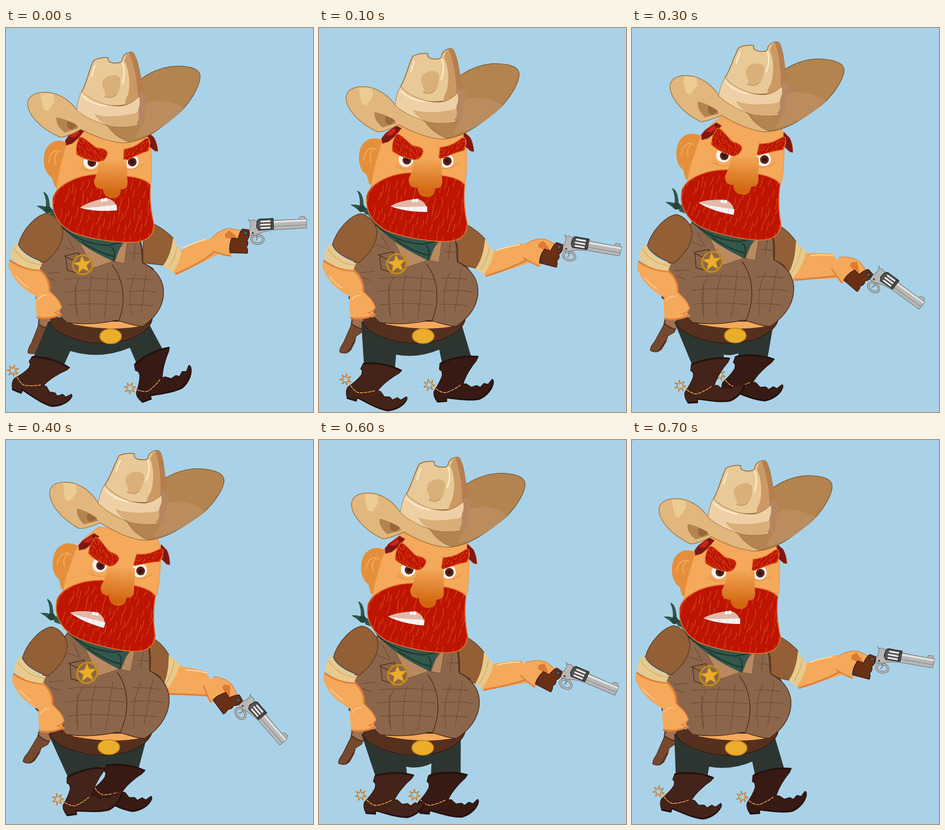
Recreate the animation shown at these times as an HTML page with a canvas. Size 669x837 px, loop 800 ms.

```html
<!DOCTYPE html>
<html lang="en">
<head>
<meta charset="utf-8">
<title>Walking sheriff</title>
<style>
html, body { margin: 0; width: 100%; height: 100%; overflow: hidden; background: #a9d2e8; }
canvas { display: block; width: 669px; height: 837px; }
</style>
</head>
<body>
<canvas id="stage" width="669" height="837"></canvas>
<script>
const c = document.getElementById('stage').getContext('2d');
const SKIN = '#f4a95b', SHADE = '#e0803a', RED = '#be1400', RUST = '#e2702a', STRAND = '#da5a1e';
const TAN = '#e9c997', TAN_LINE = '#a0713c', BROWN = '#b3844f', GLOW = '#fbeccd';
const VEST = '#8b664b', SEAM = '#6f452c', DARK = '#4a2814', GREEN = '#33574a', GOLD = '#ecae2a';

c.lineJoin = c.lineCap = 'round';

function shape(d, fill, line, w = 1.5) {
  const p = new Path2D(d);
  if (fill) { c.fillStyle = fill; c.fill(p); }
  if (line) { c.strokeStyle = line; c.lineWidth = w; c.stroke(p); }
  return p;
}

function oval(x, y, rx, ry, fill, line, w = 1.5) {
  c.beginPath();
  c.ellipse(x, y, rx, ry, 0, 0, 7);
  if (fill) { c.fillStyle = fill; c.fill(); }
  if (line) { c.strokeStyle = line; c.lineWidth = w; c.stroke(); }
}

function group(draw) { c.save(); draw(); c.restore(); }

function turn(x, y, angle) {
  c.translate(x, y);
  c.rotate(angle);
  c.translate(-x, -y);
}

// Blend two path strings that share the same commands.
function morph(a, b, u) {
  const num = /-?[\d.]+/g, to = b.match(num);
  let i = 0;
  return a.replace(num, v => +v + (to[i++] - v) * u);
}

function star(x, y, n, outer, inner, angle, fill, line, w) {
  let d = '';
  for (let i = 0; i < n * 2; i++) {
    const r = i % 2 ? inner : outer, a = angle + i * Math.PI / n;
    d += (i ? 'L' : 'M') + (x + r * Math.sin(a)) + ' ' + (y - r * Math.cos(a));
  }
  shape(d + 'Z', fill, line, w);
}

const rand = i => { const v = Math.sin(i * 12.9898) * 43758.5453; return v - Math.floor(v); };

// Short strands on a jittered grid, kept inside a path.
function strands(path, x0, y0, x1, y1, dx, dy, len, lean) {
  group(() => {
    c.clip(path);
    let i = 1, row = 0, d = '';
    for (let y = y0; y < y1; y += dy, row++)
      for (let x = x0 + (row % 2) * dx / 2; x < x1; x += dx) {
        const px = x + (rand(i++) - .5) * dx * .5, py = y + (rand(i++) - .5) * dy * .8;
        const l = len * (.7 + rand(i++) * .6), s = lean * (.4 + rand(i++));
        d += `M${px} ${py}q${-s * .1} ${l / 2} ${s} ${l}`;
      }
    shape(d, null, STRAND, 1.1);
  });
}

function foot(x, y, deg) {
  const a = deg * Math.PI / 180;
  return { x, y, a, at: (u, v) =>
    (x + u * Math.cos(a) - v * Math.sin(a)) + ' ' + (y + u * Math.sin(a) + v * Math.cos(a)) };
}

function boot(f, fill) {
  group(() => {
    c.translate(f.x, f.y);
    c.rotate(f.a);
    shape('M42-31L47-32C65-31 95-26 124-7L117-1C98 7 78 20 67 32L73 34L80 46L92 48L97 55L108 51L115 57L128 51Q131 55 126 61C115 75 95 79 83 78C60 71 40 55 21 43L18 50L-1 42Q-4 25 3 17Q25 5 35-6L38-14L35-20Z', fill, '#24100b', 1.2);
    shape('M42-30C65-29 95-24 122-6M-1 40L18 48L21 42C40 54 60 69 83 76C95 77 115 73 125 61', null, '#24100b', 2.5);
    c.setLineDash([6, 3]);
    shape('M6 6Q14 28 26 32Q45 34 60 31', null, '#eaa04a', 1.8);
    c.setLineDash([]);
    star(0, 0, 7, 13, 5, .3, null, '#c9751f', 1.6);
  });
}

function legs(k, n) {
  const L = foot([15, 58, 91, 105, 113][k], [747, 766, 774, 780, 783][k],
    [0, -6, -17.5, -26, -31, -26, -17.5, -11][n]);
  const R = foot([270, 240, 208, 191, 182][k], [785, 778, 774, 756, 746][k],
    [-43, -27, -18, -13, -9][k]);
  const a = [140, 168, 190, 200, 206][k], b = [270, 262, 245, 232, 226][k];
  shape(`M92 640L${L.at(43, -25)}L${L.at(108, -5)}L${a} ${704 + Math.min(k, 1) * 8}` +
    `Q${(a + b) / 2} ${724 - k * 3} ${b} ${697 + k * 4}L${R.at(45, -23)}L${R.at(109, -10)}L309 640Z`, '#2d3531');
  boot(R, '#371a14');
  boot(L, '#43231a');
}

function rightArm(k) {
  const u = k / 3;
  shape(morph('M300 420C325 425 345 440 364 457C368 480 360 500 344 517L298 512Z',
    'M300 420C322 430 340 440 357 465C362 495 356 520 342 538L312 520Z', u), '#925f37', '#6b4022');
  shape(morph('M370 490Q410 468 450 457L470 490Q420 515 372 538L355 525Z',
    'M370 491Q405 489 438 492L470 545Q410 545 354 551L345 535Z', u), SKIN);
  shape(morph('M370 536Q420 515 455 488', 'M354 549Q410 545 450 540', u), null, SHADE, 4);
  shape(morph('M386 479Q412 467 436 461', 'M390 496Q414 493 437 496', u), null, '#ffd9a3', 2.5);
  group(() => {
    c.translate(2.67 * k - 1.67 * k * k, 31 * k - .25 * k * k);
    turn(522, 447, k * 13 * Math.PI / 180);
    gun();
  });
  shape(morph('M364 457Q372 475 382 488Q378 515 363 533L342 518Q360 495 364 457Z',
    'M357 465Q368 478 380 488Q372 520 350 546L340 536Q356 510 357 465Z', u), '#e8ca8c');
  shape(morph('M372 478Q370 500 356 520', 'M368 480Q364 510 346 536', u), null, '#d0aa68', 1.5);
}

function gun() {
  shape('M449 457C462 444 475 437 490 437L514 442L518 460L500 470L490 497Q470 494 450 486Z', SKIN);
  shape('M449 457C462 444 475 437 490 437L512 442', null, SHADE, 1.5);
  shape('M452 487Q470 494 489 497', null, SHADE, 3);
  shape('M477 449L486 441L504 456L499 461L478 457Z', '#dd7a33');
  oval(548, 461, 13, 9, null, '#666', 5);
  oval(548, 461, 13, 9, null, '#b9b9b9', 3);
  shape('M545 452Q550 458 545 463', null, '#777', 2);
  shape('M528 417Q531 423 538 418L546 420L552 416L583 416L583 419L638 417L641 411L650 410L652 416L655 416L655 436L583 440L562 444L545 451L533 453L524 449L532 438L533 426Z', '#b7b7b7', '#666', 1);
  shape('M585 423L653 419', null, '#e4e4e4', 4);
  shape('M584 433L654 429M640 417L652 416', null, '#777', 1);
  shape('M551 417L582 415L583 438L551 441L546 434L547 422Z', '#555', '#222');
  shape('M556 422L575 421M555 429L575 428M556 436L575 435', null, '#eee', 3.5);
  shape('M578 416L579 439', null, '#333', 2);
  shape('M515 438L529 440Q533 455 525 462Q530 470 524 477Q528 485 526 491L488 490Q485 475 492 458L506 459Q509 444 515 438Z', '#6a3015', '#3a1a0c');
  oval(522, 447, 4.5, 4.5, '#56564f', '#222');
  oval(492, 484, 2.2, 2.2, '#555', '#222', 1);
  oval(538, 447, 2, 2, '#333');
}

function holster(k) {
  group(() => {
    turn(85, 640, k * 2.4 * Math.PI / 180);
    shape('M72 628L104 630L95 662L82 672L80 684L72 702Q62 714 48 708Q47 700 55 688L70 650Z', '#75492f', '#56301a');
    shape('M76 630L103 631L97 656L72 646Z', '#a07050');
    shape('M72 646Q84 655 97 655', null, '#56301a', 2.5);
    shape('M64 708Q72 700 78 684', null, '#56301a', 3);
  });
}

function belt(k) {
  shape('M98 628L140 636L290 640L319 628Q320 652 287 670C260 686 215 690 180 685C140 677 110 665 97 646Z', '#56301f', '#351a10');
  shape('M140 640L298 640L292 650Q230 662 147 646Z', SKIN);
  oval(228 - k, 672 - k * .6, 23.5, 16, GOLD, '#c08a1c', 2);
}

function torso(k) {
  const u = k / 3;
  group(() => {
    c.transform(1 + .03 * u, 0, -.06 * u, 1 + .05 * u, 33.3 * u, -32.25 * u);
    shape('M122 432C100 460 75 495 75 520C74 540 70 565 65 590L118 628L133 642C175 648 215 643 240 637C265 643 280 650 298 650C335 625 346 595 343 568C340 545 325 525 298 512C300 490 296 475 291 455L200 440Z', VEST, DARK);
    shape('M160 545C148 570 148 600 155 625M188 540C180 570 180 600 184 632M222 535C219 570 219 605 214 632' +
      'M130 548Q180 542 246 549M126 576Q180 568 250 576M134 604Q190 598 248 605M150 560L156 632' +
      'M282 535C268 565 268 595 274 625M306 530C300 560 300 590 294 620M264 547Q295 545 320 550M264 575Q300 570 330 577M262 603Q290 602 320 606' +
      'M90 535L118 532M92 545L112 552M133 455L150 485M122 475L145 484M282 470L278 505M270 490L296 492', null, SEAM, 1.2);
    shape('M231 516C254 545 264 590 246 637', null, DARK);
    shape('M291 460C297 480 294 495 298 512Q315 520 322 526', null, DARK);
    shape('M155 458L190 523L232 509L200 478Z', '#b98a61', '#7c5235', 1);
    shape('M264 462L258 513L238 509L246 482Z', '#b98a61', '#7c5235', 1);
    shape('M127 497L158 490L164 500M130 500L134 528L164 537M127 497L145 506L160 493', null, DARK);
    oval(167, 516, 21, 21, null, '#c08a1c', 4);
    star(167, 516, 5, 20, 8.5, -.12, GOLD, '#c98f1e', 1.2);
    shape('M93 396L104 412L122 436L150 460Q185 487 235 509L254 468L270 460L160 415Z', GREEN);
    shape('M120 432Q160 470 222 474L250 468M165 466Q205 492 236 498M230 478Q240 486 235 507', null, '#1f3a30', 3);
  });
}

function knot(k) {
  group(() => {
    c.translate(2 * k, -2.7 * k);
    shape('M82 358Q94 361 95 392L87 393Q90 375 82 358Z', GREEN, '#26463a', 1);
    shape('M68 388Q78 387 90 391L86 401Q78 394 68 388Z', GREEN, '#26463a', 1);
    shape('M90 392L106 396L116 414L98 408Z', GREEN);
    oval(91, 396, 8, 8, '#25443a');
  });
}

function leftArm(k) {
  group(() => {
    c.transform(1, 0, -.006 * k, 1, 5 * k, .8 * k);
    shape('M8 508C4 515 5 525 10 530C20 555 45 575 66 584C63 600 66 615 68 632Q84 636 104 630L122 625L116 619L122 608C118 592 102 582 95 572C93 555 85 540 75 525Z', SKIN);
    shape('M9 507Q40 528 75 528C90 542 95 556 95 573M68 631Q84 635 104 630L121 625', null, SHADE, 4);
    shape('M120 606C116 590 102 582 95 573M121 609Q116 618 106 620Q113 623 121 625', null, SHADE, 2);
    shape('M70 592Q76 582 88 582M22 541Q34 556 48 565', null, '#ffd09a', 2);
    shape('M88 404C105 406 124 425 124 447C122 475 105 495 84 511C60 503 35 490 27 472C35 440 65 408 88 404Z', '#925f37', '#5f381d');
    shape('M22 467C27 485 50 503 79 512L73 527C50 526 20 518 9 497C12 485 16 475 22 467Z', '#e8ca8c');
    shape('M17 480Q38 512 76 516', null, '#d0aa68', 1.5);
  });
}

function brow(d, x, y, u, lift, box) {
  group(() => {
    c.translate(4 * u, -lift * u);
    turn(x, y, .11 * u);
    strands(shape(d, RED, RUST, 1.5), ...box, 8, 7, 6, x < 220 ? 4 : -4);
  });
}

function head(k) {
  const u = k / 3;
  shape('M145 256C120 238 92 244 84 272C78 300 88 318 100 326L106 345L114 348L130 300Z', '#e58f3a');
  shape('M93 292C95 272 108 262 120 270M113 270C104 278 106 290 109 297', null, SKIN, 2.5);
  shape('M175 204C155 222 138 238 130 258C118 300 108 340 110 372L300 372L316 335C319 300 316 260 313 234L300 206Z', SKIN, '#e8964a', 1.5);
  group(() => {
    c.translate(4.5 * u, 2 * u);
    shape('M160 216L137 234L129 245L131 256L144 252L158 240L172 222Z', '#7f1812', '#c24a24', 1);
    shape('M155 222L138 237L151 238L160 228Z', '#d5201a');
    shape('M308 226L322 238Q330 252 331 269L324 268L312 258Q318 248 308 236Z', '#7f1812', '#c24a24', 1);
  });
  shape('M160 305Q185 318 208 304M256 306Q280 313 300 296M164 300Q168 306 176 309', null, '#dc8a40', 1.2);
  for (const [x, y, dy] of [[185, 292, -4], [273, 291, -1]]) {
    oval(x, y + dy * u, 16, 15.5, '#f8f1ef');
    oval(x + 2, y + 1 + dy * u, 9.5, 9.5, '#57221a');
    oval(x + 2, y + 1 + dy * u, 4, 4, '#35100b');
  }
  brow('M160 238C170 236 180 250 198 261C212 262 221 266 221 272C220 284 212 291 205 292C185 290 168 285 154 276C151 262 155 250 160 238Z',
    187, 267, u, 5.5, [153, 236, 222, 292]);
  brow('M257 264C275 262 290 253 301 243C306 238 312 240 312 246C313 255 312 262 310 268C295 272 275 282 259 290L256 287Z',
    284, 265, u, 4, [256, 240, 314, 290]);
  group(() => {
    c.translate(-2 * u, 0);
    const beard = shape('M102 372C108 345 150 322 196 319C205 317 220 335 262 323C285 325 305 330 315 342C312 375 318 410 323 430C322 455 305 466 275 467C235 468 175 459 142 444C114 428 103 405 102 385Z', RED, RUST, 2);
    strands(beard, 110, 330, 322, 456, 18, 20, 20, -5);
  });
  const g = c.createLinearGradient(0, 284, 0, 360);
  g.addColorStop(0, SKIN);
  g.addColorStop(1, '#d2660f');
  shape('M204 290C201 310 198 318 192 332Q191 352 211 351Q214 371 232 371Q250 371 250 352Q266 352 265 335C263 315 264 300 262 286Z', g);
  group(() => {
    c.translate(-7.6 * k, k);
    turn(160, 391, k * 3.7 * Math.PI / 180);
    shape('M160 392C172 382 196 374 218 370C235 373 243 385 242 398C215 400 185 399 160 392Z', '#e5b8a6', '#a81408', 1);
    shape('M163 392C190 392 215 388 241 385L242 397C215 400 185 399 163 392Z', '#f7f3f3');
    shape('M207 373L212 371L213 378L207 379ZM214 371L220 370L221 377L214 378Z', '#fff');
    shape('M185 391L186 397M200 390L201 398M214 388L215 398M228 387L229 398', null, '#e0d4d4', 1);
  });
}

function hat() {
  shape('M296 110C320 92 350 83 375 83C405 83 424 90 423 108C421 130 400 165 375 187C345 212 310 243 268 249L250 248L190 205Z', BROWN, '#7d5a34');
  shape('M300 166C320 156 355 154 388 174C360 205 320 234 282 240Q290 220 300 205Z', '#bb8c5d');
  shape('M154 178C140 160 120 143 90 140C60 139 46 150 47 168C50 190 75 220 118 238C130 238 145 231 163 221C185 232 215 246 250 250Q262 251 270 249C245 240 232 228 222 214Z', '#e1b77e', TAN_LINE);
  shape('M75 142L103 143L106 160L92 181L83 178Q76 160 75 142Z', '#ebcd94');
  shape('M110 195C125 197 145 205 154 212L158 218L128 228Q108 212 110 195Z', BROWN);
  shape('M134 203Q150 207 155 213L145 221Q130 222 134 203Z', '#96693b');
  shape('M165 139C176 120 180 95 190 72C198 66 215 63 223 65C220 74 232 77 240 76C252 76 253 74 254 65C258 56 268 52 275 53C283 56 290 85 300 143L296 150C270 172 235 172 205 166C185 160 172 150 165 139Z', TAN, TAN_LINE, 2);
  shape('M262 60C270 52 278 54 282 62C290 90 296 110 300 143L280 162L260 168Q258 160 266 145C272 120 268 90 258 72Z', '#cb9964');
  shape('M268 54C276 52 281 60 284 70C292 95 297 120 300 140L288 155C287 120 280 80 268 54Z', '#b67e50');
  shape('M213 112C225 100 243 100 249 110C250 130 245 148 232 152C222 153 215 150 215 148C222 140 202 130 213 112Z', '#d9b07a');
  shape('M215 149Q230 156 240 144', null, '#c2935c', 1.5);
  shape('M194 82C190 92 188 100 187 106M253 75C260 90 258 105 254 120', null, GLOW, 3);
  shape('M165 138C185 160 225 172 250 170C275 168 285 152 300 140C308 142 309 155 302 170C298 185 302 195 300 205C285 216 250 218 225 213C200 207 172 195 154 179C156 165 158 150 165 138Z', '#efd0a6', TAN_LINE, 1);
  shape('M193 188C220 196 250 192 280 186L292 180L300 203C280 215 250 218 225 213C210 208 200 200 193 188Z', '#d9ae78');
  shape('M288 144C300 134 309 142 308 155C300 170 304 190 300 208Q292 216 284 208C296 195 284 185 290 172Q294 160 288 144Z', '#b68562');
  shape('M167 148C180 161 200 168 218 170', null, GLOW, 3);
}

function scene(n) {
  const k = 4 - Math.abs(4 - n);
  c.fillStyle = '#a9d2e8';
  c.fillRect(0, 0, 669, 837);
  c.fillStyle = '#222';
  c.fillRect(0, 0, 1, 1);
  rightArm(k);
  holster(k);
  legs(k, n);
  belt(k);
  torso(k);
  leftArm(k);
  knot(k);
  group(() => {
    turn(340, 480, .0239 * k);
    head(k);
  });
  group(() => {
    c.translate(4.2 * k, -6.3 * k);
    turn(340, 480, .0239 * k);
    hat();
  });
}

let shown = -1;
function tick() {
  const n = Math.floor(performance.now() / 100) % 8;
  if (n !== shown) scene(shown = n);
  requestAnimationFrame(tick);
}
tick();
</script>
</body>
</html>
```
